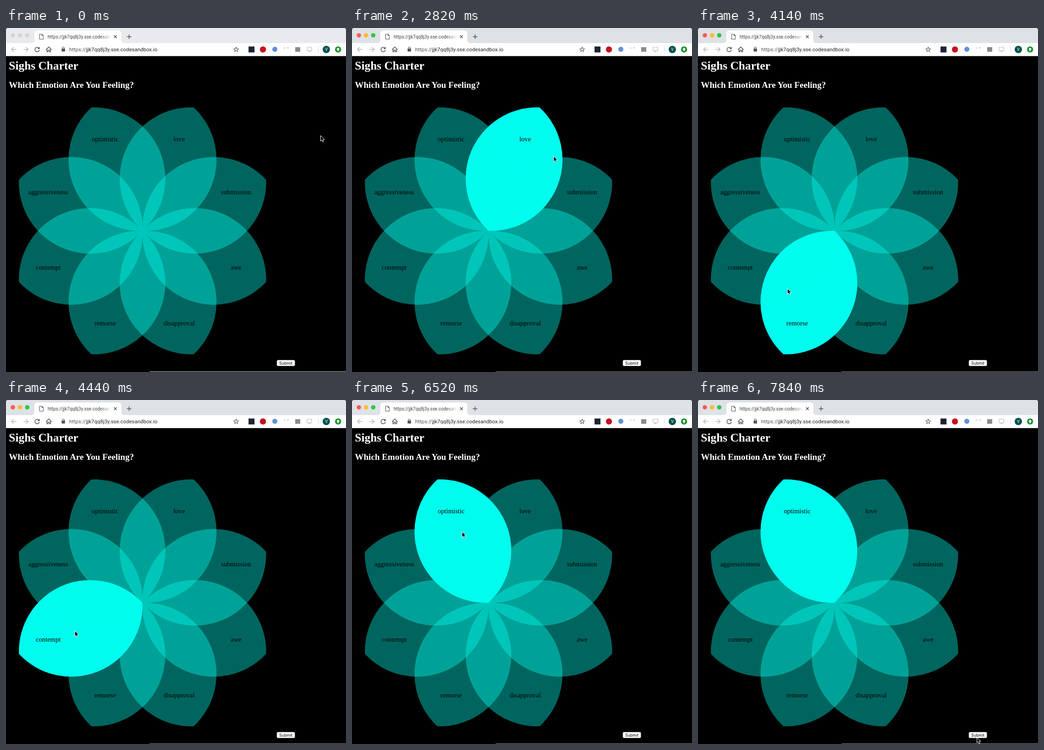
Animation of 743 by 753 pixels, one loop 7990 ms. Source, as an HTML page:

```html
<!DOCTYPE html>
<html lang="en">
<head>
<meta charset="utf-8">
<title>Sighs Charter</title>
<style>
html, body { margin: 0; width: 100%; height: 100%; overflow: hidden; background: #000; }
svg { display: block; }
.ui { font-family: Roboto, "Liberation Sans", sans-serif; }
.page { font-family: "Liberation Serif", "Times New Roman", serif; }
.head { font-weight: bold; fill: #fff; }
.label { font-size: 14.65px; text-anchor: middle; fill: #000; }
.petal { fill: #00fcee; fill-opacity: .4; }
.petal.on { fill-opacity: 1; }
.line { fill: none; stroke: #50545a; stroke-width: 1.5; }
.thin { stroke-width: 1.1; }
.dim { stroke: #b4b6b9; }
</style>
</head>
<body>
<svg width="743" height="753" viewBox="0 0 743 753">
  <defs>
    <linearGradient id="fade" gradientUnits="userSpaceOnUse" x1="205" x2="229" y1="0" y2="0">
      <stop offset="0" stop-color="#3c4043"/>
      <stop offset="1" stop-color="#3c4043" stop-opacity=".1"/>
    </linearGradient>
  </defs>

  <g class="ui">
    <path id="strip" d="M0 34V4Q0 0 4 0H739Q743 0 743 4V34Z"/>
    <g id="lights"></g>
    <path d="M55 33Q62 33 62 26V12Q62 5.500 69 5.500H245Q252 5.500 252 12V26Q252 33 259 33H743V61.500H0V33Z" fill="#fff"/>

    <path class="line thin" d="M73.500 13.500H78.500L81.500 16.500V24.500H73.500ZM78.500 13.500V16.500H81.500"/>
    <text x="91" y="22.5" font-size="10" fill="url(#fade)">https://jjk7qq8j3y.sse.codesan</text>
    <path class="line" d="M236 16l6 6M242 16l-6 6M264 19h10M269 14v10"/>

    <path class="line dim" d="M22.500 47h-10M17 42l-5 5l5 5M38 47h10M43.500 42l5 5l-5 5"/>
    <path class="line" d="M72 44A4.900 4.900 0 1 0 73 48"/>
    <path d="M73.500 41v5h-5Z" fill="#50545a"/>
    <path class="line" d="M87.500 47.500l6-6l6 6M89.500 46v6H92V48.500h3V52h2.500V46"/>
    <rect x="121.5" y="45" width="7.500" height="6.500" rx="1" fill="#50545a"/>
    <path class="line thin" d="M123 45.500V44a2.200 2.200 0 0 1 4.500 0V45.500"/>
    <text x="138" y="51" font-size="11.45" fill="#202124"><tspan fill="#50545a">https://</tspan>jjk7qq8j3y.sse.codesandbox.io</text>
    <path id="star" class="line thin"/>

    <rect x="530" y="40.5" width="13" height="13" fill="#1d2535"/>
    <circle cx="561.5" cy="47" r="6.7" fill="#c8101c"/>
    <circle cx="587.5" cy="46.5" r="5.5" fill="#5f92d6"/>
    <path class="line dim" d="M607 44h3M614 43.500h4"/>
    <rect x="632" y="42" width="11" height="10" fill="#8b8b8b"/>
    <path class="line dim thin" d="M658 42h10v8H658ZM661 50l2 2.500l2-2.500"/>
    <path d="M682.500 40v14" stroke="#d5d7da"/>
    <circle cx="700" cy="47" r="8" fill="#00514d"/>
    <text x="700" y="50.2" font-size="9" fill="#fff" text-anchor="middle">V</text>
    <circle cx="725.7" cy="47" r="6.7" fill="#16912b"/>
    <path d="M725.700 42.800l3.800 4.200h-2.300v3.500h-3V47h-2.300Z" fill="#fff"/>
  </g>

  <g class="page">
    <text class="head" x="6.3" y="90.5" font-size="25.4">Sighs Charter</text>
    <text class="head" x="6.3" y="131" font-size="19.15">Which Emotion Are You Feeling?</text>
    <g id="petals"></g>
    <g id="labels"></g>
  </g>

  <rect x="592" y="727" width="39.2" height="12.7" rx="2.5" fill="#fff" stroke="#b5b5b5" stroke-width=".6"/>
  <text x="611.5" y="736.6" text-anchor="middle" font-size="8.75" font-family="Inter, sans-serif">Submit</text>
  <path id="edge" d="M314 752.500H743"/>
  <path id="cursor" d="M.5 .5v12l2.700-2.500l2 4.300l2-.9l-1.900-4.200H9Z" stroke="#fff" stroke-linejoin="round"/>
</svg>

<script>
const LOOP = 7990, TICKS = 54;
const FOCUS = 12, CHOICE = 38; // ticks: window gains focus, petal is chosen
const CX = 298.3, CY = 444;

const $ = id => document.getElementById(id);

function add(parent, tag, attrs, text = '') {
  const el = document.createElementNS('http://www.w3.org/2000/svg', tag);
  for (const key in attrs) el.setAttribute(key, attrs[key]);
  el.textContent = text;
  parent.append(el);
  return el;
}

const lightColors = ['#fc5b57', '#fdbc2e', '#28c840'];
const lights = lightColors.map((_, i) =>
  add($('lights'), 'circle', { cx: 15 + 15.7 * i, cy: 16, r: 4.8 }));

const starPoints = Array.from({ length: 10 }, (_, i) => {
  const a = i * Math.PI / 5, r = i % 2 ? 2.4 : 5.4;
  return `${503 + r * Math.sin(a)} ${47.2 - r * Math.cos(a)}`;
});
$('star').setAttribute('d', `M${starPoints.join('L')}Z`);

// Petals and labels, clockwise from the top right
const names = ['love', 'submission', 'awe', 'disapproval',
  'remorse', 'contempt', 'aggressiveness', 'optimistic'];
const rows = [248, 363.5, 528.5, 651];
const lens = 'M0 0A155.9 155.9 0 0 1 0 -292.3A155.9 155.9 0 0 1 0 0Z';

const petals = names.map((name, i) => {
  const row = Math.min(i, 7 - i);
  const reach = row % 3 ? 205.2 : 80.8;
  const x = 297.5 + (i < 4 ? reach : -reach);
  add($('labels'), 'text', { class: 'label', x, y: rows[row] }, name);
  const transform = `translate(${CX} ${CY}) rotate(${22.5 + 45 * i})`;
  return add($('petals'), 'path', { class: 'petal', d: lens, transform });
});

// Key points of the pointer: [tick, x, y]
const path = [
  [1, 687, 235], [4, 430, 160], [7, 248, 228], [8, 248, 228],
  [10, 231, 257], [11, 231, 257], [19, 440, 280], [21, 474, 446],
  [22, 459, 454], [25, 260, 630], [27, 64, 684], [28, 195, 570],
  [32, 105, 440], [35, 187, 344], [36, 241, 314], [38, 232, 282],
  [43, 232, 282], [44, 240, 288], [46, 694, 516], [48, 694, 516],
  [53, 609, 738]
];

function pointer(tick) {
  const i = path.findIndex(key => key[0] >= tick);
  if (i < 0) return path.at(-1).slice(1);
  const [t1, x1, y1] = path[i];
  const [t0, x0, y0] = path[Math.max(0, i - 1)];
  const k = t1 > t0 ? (tick - t0) / (t1 - t0) : 1;
  return [x0 + (x1 - x0) * k, y0 + (y1 - y0) * k];
}

// The highlight trails the pointer by one tick and stays after the choice.
function litPetal(tick) {
  if (tick < FOCUS) return -1;
  const [x, y] = pointer(Math.min(tick, CHOICE) - 1);
  const turn = Math.atan2(x - CX, CY - y) / (2 * Math.PI);
  return Math.floor((turn + 1) % 1 * 8);
}

function draw(t) {
  const tick = Math.floor((t + 8) / LOOP * TICKS);
  const active = tick >= FOCUS;
  $('strip').setAttribute('fill', active ? '#dee1e6' : '#e8eaed');
  $('edge').setAttribute('stroke', active ? '#999' : '#ddd');
  lights.forEach((dot, i) => dot.setAttribute('fill', active ? lightColors[i] : '#d3d5d7'));

  const lit = litPetal(tick);
  petals.forEach((petal, i) => petal.classList.toggle('on', i === lit));
  $('cursor').setAttribute('transform', `translate(${pointer(tick)})`);
}

const start = performance.now();
function frame(now) {
  draw(Math.max(0, now - start) % LOOP);
  requestAnimationFrame(frame);
}
draw(0);
requestAnimationFrame(frame);
</script>
</body>
</html>
```
